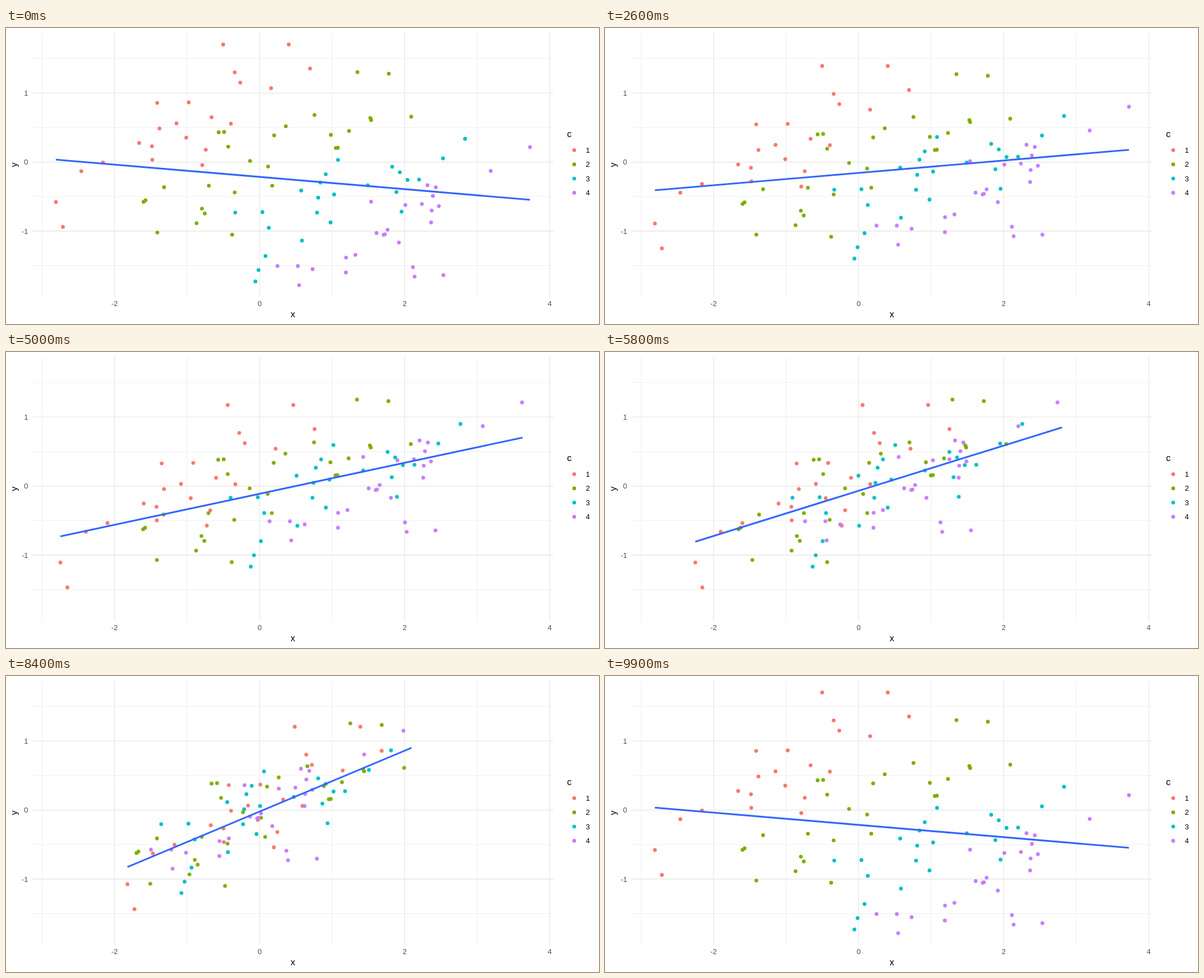
An HTML page for the animation above (10 s loop, 1058x529 px).

```html
<!DOCTYPE html>
<html lang="en">
<head>
<meta charset="utf-8">
<title>Scatter plot by group</title>
<style>
  html, body { margin: 0; width: 100%; height: 100%; overflow: hidden; background: #fff; }
  svg { display: block; width: 100%; height: 100%; }
  text { font: 12.93px "Liberation Sans", Arial, sans-serif; }
  .tick { fill: #4d4d4d; }
  .title { font-size: 16.17px; }
  .major, .minor { stroke: #ebebeb; stroke-width: 1.57; }
  .minor { stroke-width: .78; }
  .group { animation: shift 10s infinite; }
  .fit { fill: none; stroke: #36f; stroke-width: 3.14; animation: fit 10s infinite; }

  /* Hold, centre y, hold, centre x, hold, return; ten steps per second */
  @keyframes shift {
    0% { transform: translate(0, 0); }
    17% { transform: translate(0, 0); animation-timing-function: steps(17, start); }
    34%, 50% { transform: translate(0, var(--dy)); animation-timing-function: steps(17, start); }
    67%, 84% { transform: translate(var(--dx), var(--dy)); animation-timing-function: steps(16, start); }
    100% { transform: translate(0, 0); }
  }
  @keyframes fit {
    0% { d: path("M89 235.3L934.8 307"); }
    17% { d: path("M89 235.3L934.8 307"); animation-timing-function: steps(17, start); }
    34%, 50% { d: path("M89 328.3L934.8 155.2"); animation-timing-function: steps(17, start); }
    67%, 84% { d: path("M225.2 348.5L709.4 116.5"); animation-timing-function: steps(16, start); }
    100% { d: path("M89 235.3L934.8 307"); }
  }
</style>
</head>
<body>
<svg viewBox="0 0 1058 529">
  <g id="grid"></g>
  <g id="points"></g>
  <path class="fit" d="M89 235.3L934.8 307"/>
  <g id="labels">
    <text class="title" x="511.9" y="517.3" text-anchor="middle">x</text>
    <text class="title" transform="translate(19.6 244.5) rotate(-90)" text-anchor="middle">y</text>
    <text class="title" x="1001.1" y="195.2">c</text>
  </g>
</svg>
<script>
const panel = { left: 46.7, right: 977.3, top: 8.1, bottom: 480.9 };
const toX = v => 452.5 + 129.4 * v;
const toY = v => 239.6 - 123.3 * v;

const groups = [
  { color: '#F8766D', dx: 136.2, dy: 65.3, points: [
    [387.5, 29.5], [504.5, 29.5], [408, 79.3], [418, 97.6], [473, 107.6], [542.5, 72.5],
    [269.8, 133.8], [326, 132.9], [366.8, 159.6], [401.2, 171], [304.2, 170.4], [273.8, 179.6],
    [321.6, 196], [237.6, 205.4], [260.4, 211.3], [261, 235.6], [356.4, 217.6], [350.2, 245],
    [173, 240.4], [134.4, 255.9], [89, 310.9], [101.5, 355.5]] },
  { color: '#7CAE00', dx: -13.5, dy: 6.1, points: [
    [627, 78.9], [683, 81.7], [550.4, 155.4], [650, 161], [651.5, 164.5], [723, 158.5],
    [499.2, 175.6], [612, 184], [579.6, 191], [588.5, 214.4], [592, 214], [478.4, 191.9],
    [379.4, 186.5], [389.2, 185.7], [396.4, 212.1], [435.5, 237.6], [467.7, 247.6], [475, 281.8],
    [362, 281.8], [408, 293.8], [282, 284.5], [245.4, 310.7], [249, 308], [349.5, 322.8],
    [354.6, 331.4], [340, 348.8], [270, 365.6], [403.5, 369.4]] },
  { color: '#00BFC4', dx: -140.9, dy: -69.4, points: [
    [819, 198], [779.6, 233], [592.4, 235.7], [689, 247.9], [702.6, 257.8], [716.4, 271.5],
    [737, 270.9], [570.5, 261.3], [561, 276.2], [645.5, 281.2], [696.5, 293.2], [705.8, 328.2],
    [526.7, 290.5], [557, 303.2], [585.4, 297.5], [555, 329.9], [579, 347.5], [409, 329.8],
    [457.5, 329], [468.9, 357.2], [528, 379.9], [463, 407.5], [450.6, 432.6], [445, 452.9]] },
  { color: '#C77CFF', dx: -240.8, dy: -122.9, points: [
    [934.8, 213], [864.8, 255.4], [752, 281], [766.8, 284.7], [761.6, 300.2], [772.3, 318.4],
    [742, 314.6], [712.5, 316.4], [651.4, 310.4], [759.4, 326.1], [758.5, 347.5], [680.8, 360.6],
    [661.2, 366.5], [673.8, 369.6], [676, 368.6], [700.9, 383.4], [623.4, 405.4], [606.7, 410.3],
    [606.4, 437], [484.4, 425.4], [520.7, 425.4], [547, 431], [523, 459.6], [726, 427.4],
    [729, 444.3], [780.4, 441.7]] }
];

function add(parent, tag, attrs, text = '') {
  const node = document.createElementNS('http://www.w3.org/2000/svg', tag);
  for (const name in attrs) node.setAttribute(name, attrs[name]);
  node.textContent = text;
  parent.append(node);
  return node;
}

const grid = document.getElementById('grid');
const labels = document.getElementById('labels');
const pointLayer = document.getElementById('points');

const vLine = (v, kind) => add(grid, 'line',
  { class: kind, x1: toX(v), x2: toX(v), y1: panel.top, y2: panel.bottom });
const hLine = (v, kind) => add(grid, 'line',
  { class: kind, y1: toY(v), y2: toY(v), x1: panel.left, x2: panel.right });

[-1.5, -.5, .5, 1.5].forEach(v => hLine(v, 'minor'));
[-3, -1, 1, 3].forEach(v => vLine(v, 'minor'));
for (const v of [-1, 0, 1]) {
  hLine(v, 'major');
  add(labels, 'text', { class: 'tick', x: 39.5, y: toY(v) + 4.6, 'text-anchor': 'end' }, v);
}
for (const v of [-2, 0, 2, 4]) {
  vLine(v, 'major');
  add(labels, 'text', { class: 'tick', x: toX(v), y: 497.4, 'text-anchor': 'middle' }, v);
}

const dot = (parent, cx, cy, fill) => add(parent, 'circle', { cx, cy, r: 3.39, fill });

groups.forEach(({ color, dx, dy, points }, i) => {
  const layer = add(pointLayer, 'g', { class: 'group', style: `--dx:${dx}px;--dy:${dy}px` });
  points.forEach(([x, y]) => dot(layer, x, y, color));

  const keyY = 218.3 + 25.4 * i;
  dot(labels, 1013.8, keyY, color);
  add(labels, 'text', { x: 1034.6, y: keyY + 4.6 }, i + 1);
});
</script>
</body>
</html>
```
